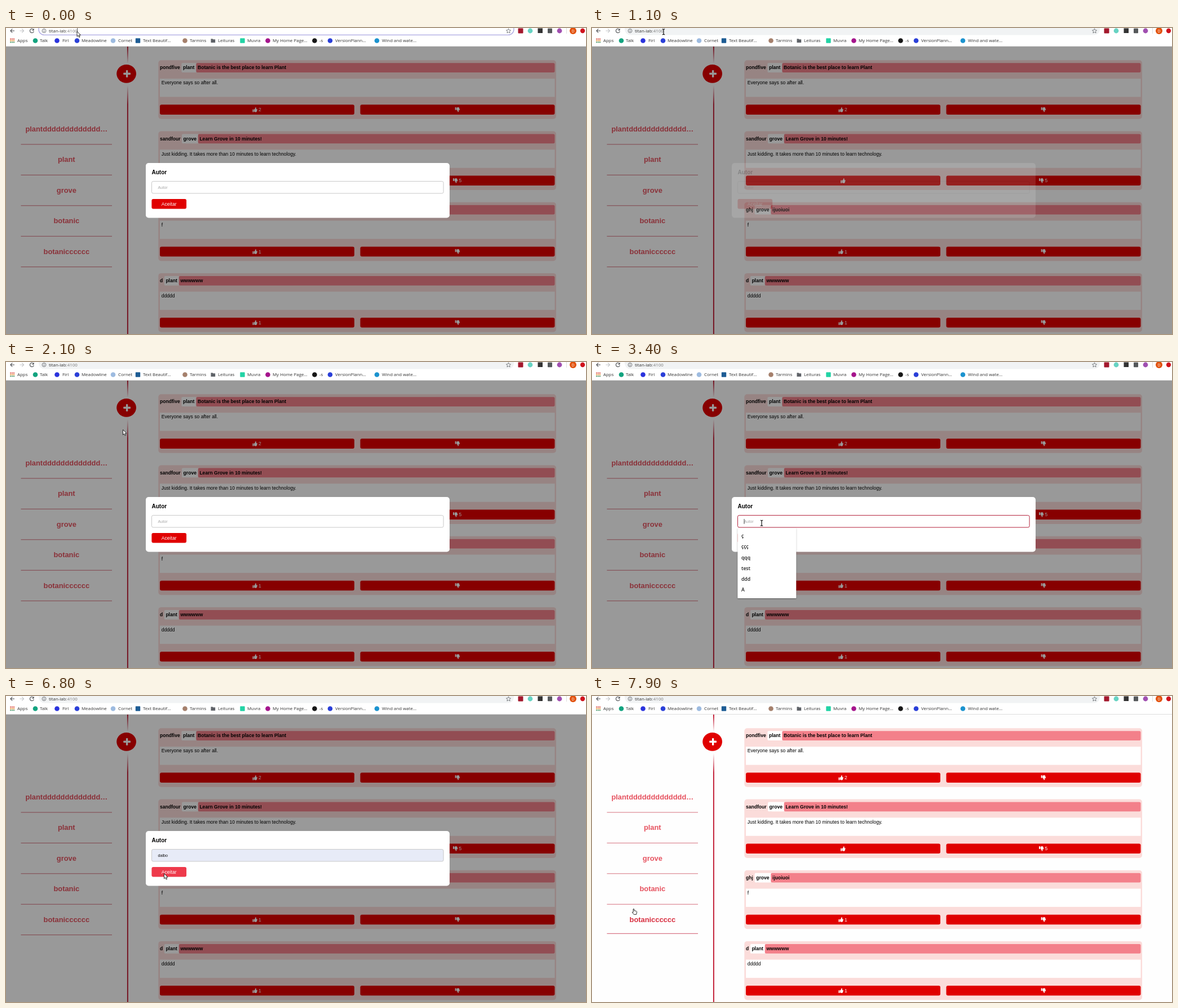
Write an HTML page that moves like this. It is 1029 by 544 pixels and loops after 8 s.

```html
<!DOCTYPE html>
<html lang="pt">
<head>
<meta charset="utf-8">
<title>Posts</title>
<style>
html, body { margin: 0; width: 100%; height: 100%; overflow: hidden; background: #fefefe; }
svg { display: block; width: 1029px; height: 544px; font: 8.57px "Liberation Sans", Arial, sans-serif; }
.ui { font-family: "Open Sans", sans-serif; }
.b { font-weight: bold; }
</style>
</head>
<body>
<svg id="stage" viewBox="0 0 1029 544"></svg>
<script>
const RED = '#e00000', LINE = '#c0152f', LOOP = 8000;
const stage = document.getElementById('stage');

const rect = (x, y, w, h, fill, r = 0, more = '') =>
  `<rect x="${x}" y="${y}" width="${w}" height="${h}" rx="${r}" fill="${fill}" ${more}/>`;
const dot = (x, y, r, fill) => `<circle cx="${x}" cy="${y}" r="${r}" fill="${fill}"/>`;
const text = (x, y, s, fill = '#000', more = '') => `<text x="${x}" y="${y}" fill="${fill}" ${more}>${s}</text>`;
const path = (d, more) => `<path d="${d}" ${more}/>`;
const stroke = (color, w = 1.1) => `fill="none" stroke="${color}" stroke-width="${w}"`;
const size = (px, cls = 'b') => `font-size="${px}" class="${cls}"`;
const mid = 'text-anchor="middle"';
const clamp = v => Math.max(0, Math.min(1, v));

// Browser chrome: label x, label, icon x, icon colour, square icon
const bookmarks = [
  [20, 'Apps'], [60, 'Talk', 52, '#12a37f'], [100, 'Firl', 90.5, '#2a33dd'],
  [134, 'Meadowline', 126, '#2a3fd8'], [199, 'Cornet', 190, '#9dbbe0'],
  [243, 'Text Beautif…', 234, '#1d5c94', 1], [326, 'Tarmins', 317.5, '#a5806c'],
  [376, 'Leituras'], [428, 'Muvra', 419.5, '#22d3a5', 1], [473, 'My Home Page…', 464.5, '#a5148c'],
  [556, '-s', 547.5, '#161616'], [584, 'VersionPlann…', 575, '#2a3fd8'],
  [667, 'Wind and wate…', 658, '#1b93cf']
];

function chrome(t) {
  const focused = t < 900, loading = t >= 900 && t < 1100;
  let s = rect(0, 0, 1029, 33, '#fff') + rect(0, 32, 1029, 1, '#dcdcdc');
  s += rect(58, -8, 843, 20.4, focused ? '#fff' : '#f1f3f4', 10, focused ? 'stroke="#aaa6e2" stroke-width="1.3"' : '');
  s += path('M15 5H8M11.3 1.6L7.9 5L11.3 8.4', stroke('#4a4d51'));
  s += path('M24.5 5H31.5M28.2 1.6L31.6 5L28.2 8.4', stroke('#c4c6c8'));
  s += loading
    ? path('M43 2L49 8M49 2L43 8', stroke('#4a4d51', 1.2))
    : path('M48.8 3A3.5 3.5 0 1 0 49.3 6', stroke('#4a4d51')) + path('M49.6 .8V4.4H46z', 'fill="#4a4d51"');
  s += `<circle cx="67.5" cy="5" r="3.4" ${stroke('#5f6368', .9)}/>` + rect(67, 4.5, 1, 2.6, '#5f6368') + rect(67, 2.7, 1, 1, '#5f6368');
  s += text(76, 7.7, 'titan-lab<tspan fill="#777">:4100</tspan>', '#333', size(7.9, 'ui'));
  if (t < 200) s += rect(126, 0, .8, 6, '#333');
  s += path('M891.5 1L892.7 3.8L895.6 4L893.4 6L894.1 8.9L891.5 7.3L888.9 8.9L889.6 6L887.4 4L890.3 3.8Z', stroke('#5f6368', .8));

  s += rect(908.5, .5, 9, 9, loading ? '#e6e6e6' : '#a3182c', 1);
  s += dot(930, 5, 4.4, loading ? '#dcdcdc' : '#67d3c3');
  s += rect(943.5, .5, 8.5, 8.5, '#333') + rect(961, .8, 8, 8.4, '#55585a', 1) + dot(982, 5, 4.4, '#a04fb0');
  s += rect(994, 0, .8, 10, '#d5d5d5') + dot(1006, 5, 6, '#e2510c');
  s += text(1006, 7.5, 'D', '#fff', `${mid} ${size(6.8, 'ui')}`) + dot(1023, 5, 4.2, '#d0131d');

  for (let i = 0; i < 9; i++)
    s += rect(7.3 + i % 3 * 2.9, 18.6 + Math.floor(i / 3) * 2.9, 1.9, 1.9, ['#db4437', '#e08a2c', '#3d8f5a'][Math.floor(i / 3)]);
  s += path('M363.5 19.3H366.5L367.5 20.3H371.2V26H363.5Z', 'fill="#5f6368"');
  for (const [x, label, ix, fill, square] of bookmarks) {
    s += text(x, 25.3, label, '#333', size(7.9, 'ui'));
    if (ix) s += square ? rect(ix - 4.2, 18.3, 8.4, 8.4, fill, .8) : dot(ix, 22.5, 4.3, fill);
  }
  return s;
}

// Page
const tags = ['plantddddddddddddd…', 'plant', 'grove', 'botanic', 'botanicccccc'];
// author, tag, title, body, likes, dislikes, tag x, title x
const posts = [
  ['pondfive', 'plant', 'Botanic is the best place to learn Plant', 'Everyone says so after all.', 2, '', 311.4, 337.3],
  ['sandfour', 'grove', 'Learn Grove in 10 minutes!', 'Just kidding. It takes more than 10 minutes to learn technology.', '', 5, 312, 340.7],
  ['ghj', 'grove', 'ijuoiuoi', 'f', 1, '', 288.6, 317.3],
  ['d', 'plant', 'wwwwww', 'ddddd', 1, '', 280.8, 306.7]
];

function thumb(x, y, flip) {
  return path('M0 7H3.8V16H0ZM5 7.6L8.4 4.2L9.4 0C12 0 12.8 2 12.2 3.8L11.4 6H14.6C16.2 6.4 16.2 8 15.4 9L13.8 14.6Q13.2 16 12 16H8.4L5 14.6Z',
    `fill="#fff" transform="translate(${x - 4.2} ${y}) scale(.53 ${flip ? -.53 : .53}) translate(0 -8)"`);
}

function vote(x, y, count, flip) {
  const c = x + 172.4, shift = count === '' ? 0 : 3.7;
  return rect(x, y, 345, 17.6, RED, 3) + thumb(c - shift, y + 8.9, flip) + text(c + 2.7, y + 11.9, count, '#fff');
}

function card([author, tag, title, body, up, down, tagX, titleX], i) {
  const y = 57.3 + i * 126.2;
  return rect(270.3, y, 705.7, 104.5, '#fbdcda', 5)
    + text(273, y + 16.1, author, '#000', 'class="b"')
    + rect(tagX, y + 5, titleX - tagX + 1, 16.8, '#fff', 2)
    + rect(titleX, y + 5, 973.5 - titleX, 16.8, '#f3808a', 2.5)
    + text(tagX + 2.6, y + 16.1, tag, '#000', 'class="b"')
    + text(titleX + 2.7, y + 16.1, title, '#000', 'class="b"')
    + rect(273, y + 32.8, 700.5, 32.4, '#fff')
    + text(275.7, y + 43, body)
    + vote(273, y + 79, up) + vote(628.5, y + 79, down, true);
}

function sidebar(hovered) {
  return tags.map((tag, i) => {
    const y = 184 + i * 54.45, on = i === hovered;
    return text(107.3, y, tag, on ? '#d82f40' : '#e6525f', `${mid} ${size(12.86)}`)
      + rect(26.5, y + (on ? 20 : 22.4), 161.5, 1, on ? '#d0566a' : '#d6727f');
  }).join('');
}

function page(empty, hovered) {
  let s = rect(0, 33, 1029, 511, '#fefefe')
    + rect(214.9, 33, 1.9, 30, 'url(#out)') + rect(214.9, 100, 1.9, 444, 'url(#in)')
    + `<ellipse cx="213.6" cy="81.3" rx="17.4" ry="16.4" fill="${RED}"/>`
    + rect(208.2, 79.6, 12.8, 3.4, '#fff', 1) + rect(212.9, 74.9, 3.4, 12.8, '#fff', 1);
  if (empty)
    return s + text(625.8, 192.3, 'Sem Posts', '#ee9198', `${mid} ${size(17.15)}`)
      + text(625.8, 334.2, "Carregue no botão '+' para adionar posts", '#ec979f', `${mid} ${size(10.03)}`);
  return s + sidebar(hovered) + posts.map(card).join('');
}

// Dialog
const NAME = 'dalbo', keyTimes = [3700, 3800, 3900, 4100, 4300];

function dialog(t, cur) {
  const focus = t >= 3400 && t < 6800, filled = t >= 5200 && t < 6900;
  const typed = t < 3400 ? '' : NAME.slice(0, keyTimes.filter(k => t >= k).length);
  const open = t >= 3400 && t < 5700;
  const hover = t >= 5700 && cur.y > 304;
  let s = rect(248, 240, 539, 97.5, '#fff', 5)
    + text(258.5, 260, 'Autor', '#000', size(10.03))
    + rect(258.5, 272.6, 517.6, 21.4, filled ? '#e7ebf7' : '#fff', 2.6, `stroke="${focus ? '#b3203a' : '#c8c8c8'}" stroke-width="1"`)
    + text(269.6, 285.9, typed || 'Autor', typed ? '#111' : '#a5a5a5', 'font-size="7.15"')
    + rect(258.4, 304, 61.7, 17.4, hover ? '#ee3a4b' : RED, 3)
    + text(289.2, 315.5, 'Aceitar', '#fff', mid);
  const caret = focus && (t < 4700 || t >= 5200 && t < 5700 || t >= 6200);
  if (caret) s += rect(269.6 + typed.length * 3.5, 279, .8, 9, '#222');
  if (open) {
    const list = t < 3800 ? ['ç', 'ççç', 'qqq', 'test', 'ddd', 'A']
      : t < 4300 ? ['ddd', NAME, 'Dalbo'] : [NAME, 'Dalbo'];
    s += rect(258.4, 295, 103.8, 9.4 + list.length * 19.25, '#fff', 1, 'filter="url(#shade)"');
    if (t >= 5100) s += rect(258.4, 299.4, 103.8, 19.4, '#dadbdd');
    list.forEach((item, i) => s += text(265, 312.2 + i * 19.25, item, '#1c1c1c', `${size(8.6, 'ui')} font-weight="600"`));
  }
  return s;
}

// Pointer route: time, x, y
const route = [
  [0, 126, 6], [600, 126, 6], [700, 127, 6.5], [1900, 127, 6.5], [2300, 288, 234], [2400, 288, 234],
  [2700, 302, 288], [2800, 303, 298], [2900, 301, 287], [3100, 301, 286], [4900, 301, 286],
  [5000, 291, 289], [5100, 281.5, 298], [5300, 281, 305], [5900, 281, 305], [6000, 281, 307],
  [6100, 281, 307], [6400, 280.5, 321], [6600, 280.5, 315.5], [7300, 280.5, 315.5],
  [7700, 105, 362], [7900, 72, 378], [LOOP, 72, 378]
];

function pointer(t) {
  const i = route.findIndex(p => p[0] > t);
  const [t0, x0, y0] = route[i - 1], [t1, x1, y1] = route[i];
  const k = (t - t0) / (t1 - t0);
  return { x: x0 + (x1 - x0) * k, y: y0 + (y1 - y0) * k };
}

function cursor(t, { x, y }, hand) {
  if (t >= 3700 && t < 5000) return '';
  const beam = t >= 700 && y < 12 || t < 5100 && y > 271 && y < 294;
  const at = `transform="translate(${x} ${y})"`;
  if (beam) return path('M-2.2 -4.6Q0 -4.6 0 -3.4Q0 -4.6 2.2 -4.6M0 -3.8V4.4M-2.2 5.2Q0 5.2 0 4Q0 5.2 2.2 5.2', `${at} ${stroke('#111', 1.2)}`);
  const shape = hand
    ? 'M1 1Q2 -.6 2.8 1V3.6L6.6 4.4Q8 5 7.4 7L6.6 10.4H2.4L-.6 6.8Q-.4 5.4 1.2 6.4Z'
    : 'M0 0V9.2L2.1 7.3L3.7 10.6L5.2 9.9L3.7 6.7H6.5Z';
  return path(shape, `${at} fill="#fff" stroke="#161616" stroke-width=".9" stroke-linejoin="round"`);
}

const fade = (id, y1, y2, from, to) =>
  `<linearGradient id="${id}" gradientUnits="userSpaceOnUse" x1="0" x2="0" y1="${y1}" y2="${y2}">
  <stop stop-color="${LINE}" stop-opacity="${from}"/><stop offset="1" stop-color="${LINE}" stop-opacity="${to}"/></linearGradient>`;
const defs = `<defs>${fade('out', 36, 63, 1, 0)}${fade('in', 102, 136, 0, 1)}
  <filter id="shade" x="-10%" y="-10%" width="120%" height="120%"><feDropShadow dx="0" dy="1" stdDeviation="1.3" flood-opacity=".4"/></filter></defs>`;

function scene(t) {
  const cur = pointer(t), empty = t >= 900 && t < 1100;
  const inList = t >= 6900 && cur.x > 26 && cur.x < 188;
  const hovered = inList ? Math.floor((cur.y - 152.4) / 54.45) : -1;
  let s = defs + page(empty, hovered);
  if (!empty && t < 6900) {
    const alpha = t < 900 ? 1 : clamp((t - 1050) / 400);
    s += rect(0, 33, 1029, 511, '#000', 0, 'opacity=".4"') + `<g opacity="${alpha}">${dialog(t, cur)}</g>`;
  }
  return s + chrome(t) + cursor(t, cur, inList);
}

// The screen updates ten times a second
let shown = -1;
function tick(now) {
  const t = Math.floor(now % LOOP / 100) * 100;
  if (t !== shown) stage.innerHTML = scene(shown = t);
  requestAnimationFrame(tick);
}
tick(performance.now());
</script>
</body>
</html>
```
